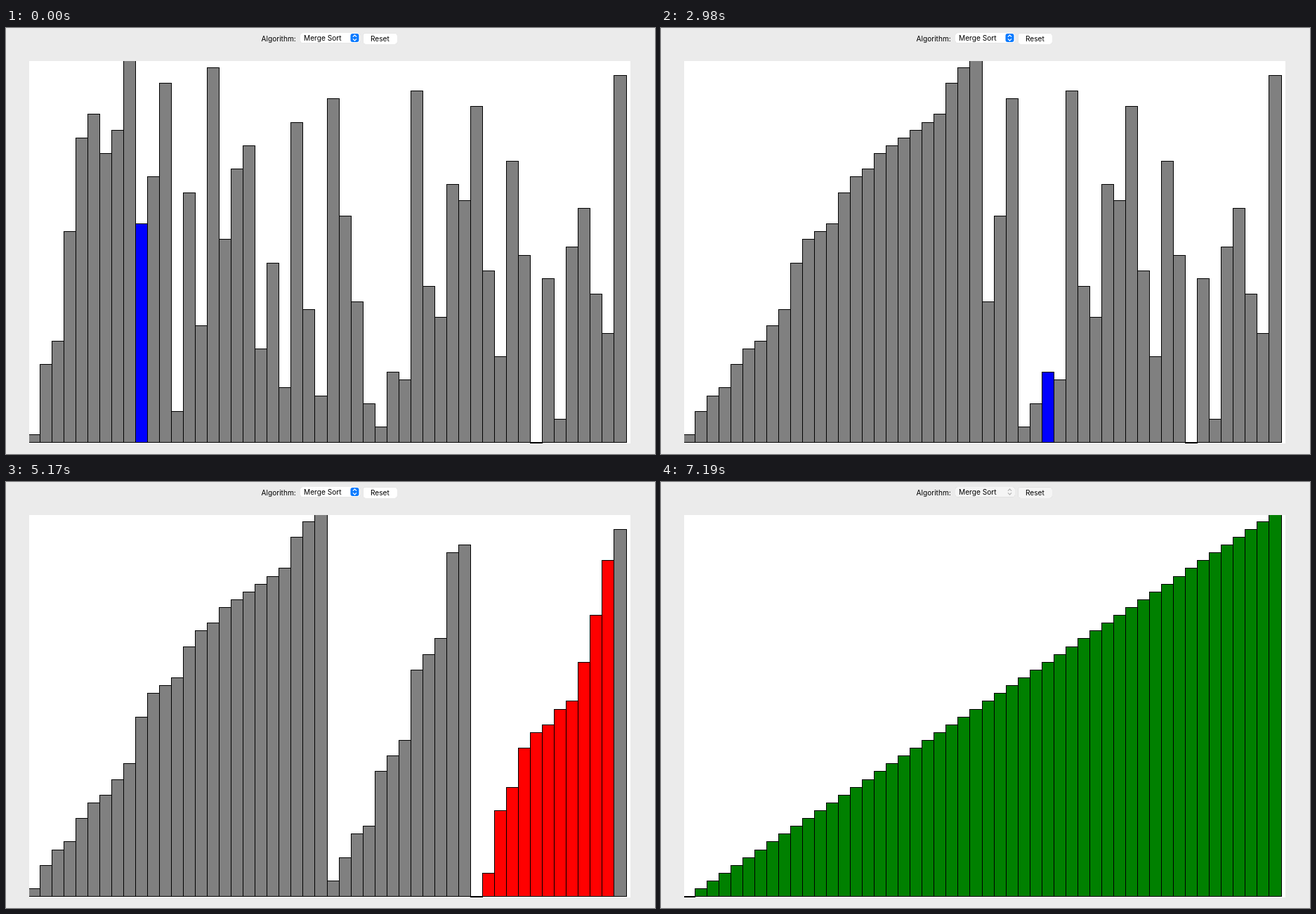
An HTML page with a canvas that plays this animation: 924x606 px, repeating every 7290 ms.

```html
<!DOCTYPE html>
<html lang="en">
<head>
<meta charset="utf-8">
<title>Merge Sort</title>
<style>
html, body { margin: 0; width: 100%; height: 100%; overflow: hidden; background: #ebebeb; }
canvas, svg { position: absolute; left: 0; top: 0; display: block; }
text { font: 10.15px Inter, Roboto, sans-serif; fill: #000; }
.face { fill: #fff; filter: drop-shadow(0 .5px .5px rgba(0, 0, 0, .25)); }
.knob { fill: #0a7aff; }
.arrows { fill: none; stroke: #fff; stroke-width: 1.2; stroke-linecap: round; stroke-linejoin: round; }
.idle .face { fill: #f5f5f5; }
.idle .knob { fill: none; }
.idle .arrows { stroke: #b4b4b4; }
</style>
</head>
<body>
<canvas id="stage" width="924" height="606"></canvas>
<svg id="controls" width="924" height="30">
  <rect class="face" x="419" y="7" width="85" height="14.5" rx="4"/>
  <rect class="knob" x="490.5" y="8" width="12" height="12" rx="3"/>
  <path class="arrows" d="M494.2 12.3l2.3-2.3 2.3 2.3M494.2 15.7l2.3 2.3 2.3-2.3"/>
  <rect class="face" x="508.5" y="7.5" width="48.5" height="15.5" rx="4"/>
  <text x="363.5" y="18.6">Algorithm:</text>
  <text x="424" y="17.9">Merge Sort</text>
  <text x="519" y="18.8">Reset</text>
</svg>
<script>
(() => {
  const LOOP = 7290, DONE = 6830, IDLE = 7190, HOLD = 30;
  const GRAY = '#808080', BLUE = '#0000ff', GREEN = '#008000', RED = '#ff0000';
  const ctx = document.getElementById('stage').getContext('2d');
  const controls = document.getElementById('controls');

  // the shuffled values to sort
  const data = [
    1, 10, 13, 27, 39, 42, 37, 40, 49, 28, 34, 46, 4, 32, 15, 48, 26, 35, 38, 12, 23, 7, 41, 17, 6,
    44, 29, 18, 5, 2, 9, 8, 45, 20, 16, 33, 31, 43, 22, 11, 36, 24, 0, 21, 3, 25, 30, 19, 14, 47
  ];
  const N = data.length;
  const steps = [];

  // cost is the relative time a step stays on screen
  function addStep(cost, colorOf) {
    steps.push({ cost, colorOf, values: data.slice() });
  }

  function merge(l, mid, r) {
    const out = [];
    let i = l, j = mid;
    while (i < mid && j < r) {
      const pick = data[i] < data[j] ? i : j;
      const prev = pick === mid - 1 && j === r - 1 ? pick - 1 : -1;
      addStep(1, k => k === pick ? BLUE : k === prev && k >= l ? GREEN : GRAY);
      out.push(data[pick]);
      if (pick === i) i++; else j++;
    }
    out.push(...data.slice(i, mid), ...data.slice(j, r));
    out.forEach((v, k) => { data[l + k] = v; });
    addStep(3, k => r === N && k >= l && k < r - 1 ? RED : GRAY);
  }

  function mergeSort(l, r) {
    if (r - l < 2) return;
    const mid = (l + r) >> 1;
    mergeSort(l, mid);
    mergeSort(mid, r);
    if (l === 6 && r === 12) steps.length = 0; // playback begins here
    merge(l, mid, r);
  }
  mergeSort(0, N);

  // key steps with their times; the steps between share the time by cost
  const keys = [[0, 120], [55, 1950], [101, 2980], [127, 3790], [176, 5170], [232, 6330], [250, 6780]];
  keys.forEach(([step, time], n) => {
    steps[step].start = time;
    if (n === keys.length - 1) return;
    const [nextStep, nextTime] = keys[n + 1];
    const part = steps.slice(step + 1, nextStep);
    const unit = (nextTime - time - HOLD) / part.reduce((sum, s) => sum + s.cost, 0);
    let at = time + HOLD;
    for (const s of part) {
      s.start = at;
      at += s.cost * unit;
    }
  });
  const sorted = { values: data, colorOf: () => GREEN };

  const edge = i => Math.floor(31 + 17.04 * i);
  const level = v => Math.round(589.3 - 11.116 * v);

  function drawBar(i, v, color) {
    const x = edge(i), w = edge(i + 1) - x, y = level(v);
    ctx.fillStyle = '#000';
    if (v === 0) {
      ctx.fillRect(x, 589, w + 1, 2);
      return;
    }
    ctx.fillRect(x, y, w + 1, 590 - y);
    ctx.fillStyle = color;
    ctx.fillRect(x + 1, y + 1, w - 1, 588 - y);
  }

  function draw({ values, colorOf }) {
    ctx.fillStyle = '#ebebeb';
    ctx.fillRect(0, 0, 924, 606);
    ctx.save();
    ctx.beginPath();
    ctx.rect(33, 47, 856, 544);
    ctx.clip();
    ctx.fillStyle = '#fff';
    ctx.fillRect(33, 47, 856, 544);
    values.forEach((v, i) => drawBar(i, v, colorOf(i)));
    ctx.restore();
  }

  function stepAt(t) {
    if (t >= DONE) return sorted;
    let n = steps.length - 1;
    while (n > 0 && steps[n].start > t) n--;
    return steps[n];
  }

  const begin = performance.now();
  function tick() {
    const t = (performance.now() - begin) % LOOP;
    draw(stepAt(t));
    controls.classList.toggle('idle', t >= IDLE);
    requestAnimationFrame(tick);
  }
  tick();
})();
</script>
</body>
</html>
```
